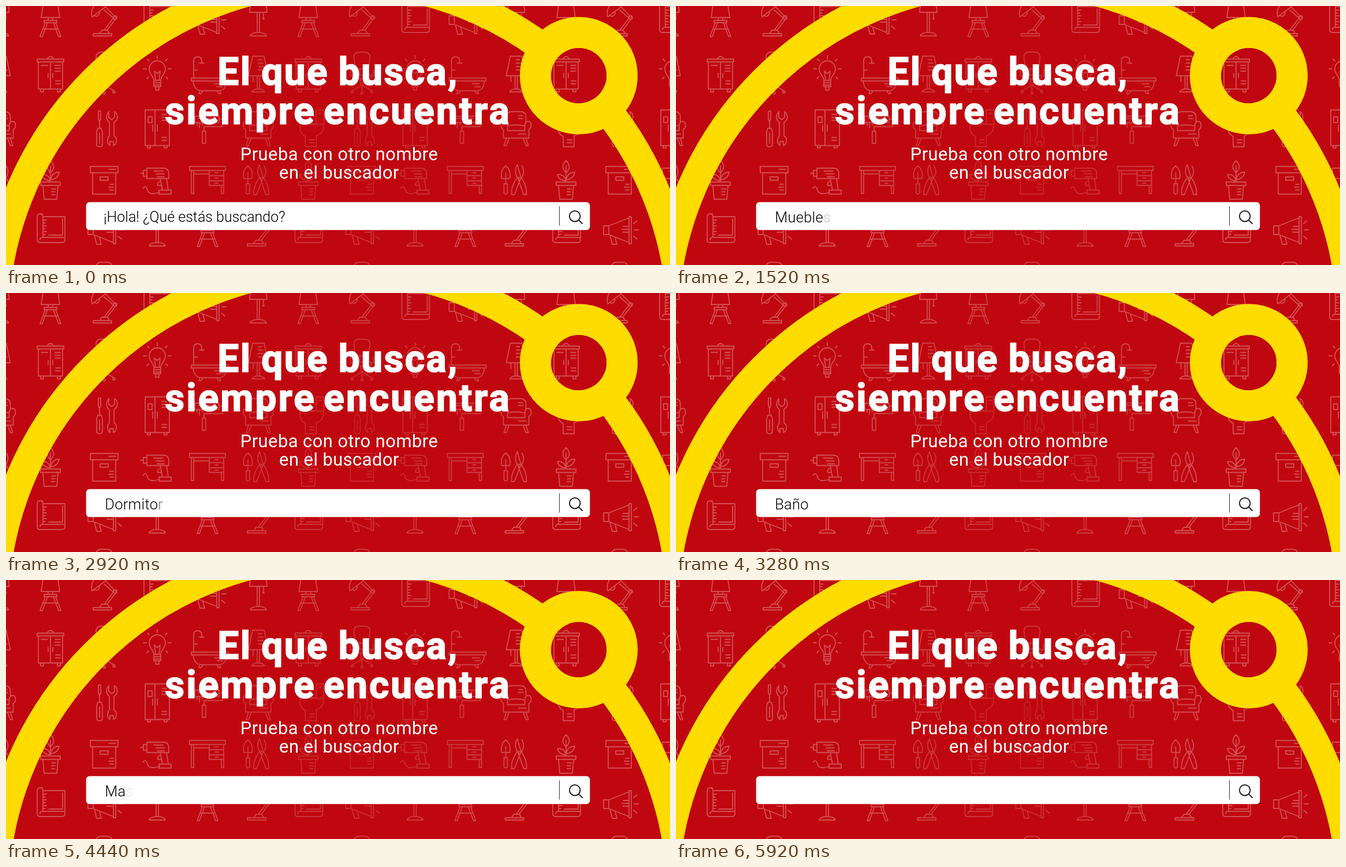
An HTML page for the animation above (6000 ms loop, 1150x450 px).

```html
<!DOCTYPE html>
<html lang="es">
<head>
<meta charset="utf-8">
<title>El que busca, siempre encuentra</title>
<style>
html, body { margin: 0; width: 100%; height: 100%; overflow: hidden; background: #c0070f; }
svg { display: block; width: 1150px; height: 450px; font-family: Roboto, "Open Sans", sans-serif; }
.icons { fill: none; stroke: #fff; stroke-width: 1.8; stroke-linejoin: round; stroke-linecap: round; }
.ring { fill: none; stroke: #ffdc00; }
.title { font-size: 66px; font-weight: 700; fill: #fff; stroke: #fff; stroke-width: 1.6; text-anchor: middle; }
.sub { font-size: 31px; letter-spacing: .4px; fill: #fff; text-anchor: middle; }
.query { font-size: 25.5px; font-weight: 300; letter-spacing: .25px; fill: #000; }
.query.hint { font-size: 25px; letter-spacing: 0; }
.lens { fill: none; stroke: #222; stroke-width: 2; stroke-linecap: round; }
</style>
</head>
<body>
<svg viewBox="0 0 1150 450">
  <defs>
    <radialGradient id="dim" gradientUnits="userSpaceOnUse" cx="600" cy="255" r="310">
      <stop offset="0" stop-color="#555"/>
      <stop offset=".4" stop-color="#888"/>
      <stop offset="1" stop-color="#fff"/>
    </radialGradient>
    <mask id="fade" maskUnits="userSpaceOnUse" x="0" y="0" width="1150" height="450">
      <rect width="1150" height="450" fill="url(#dim)"/>
    </mask>
    <mask id="hole" maskUnits="userSpaceOnUse" x="0" y="0" width="1150" height="450">
      <rect width="1150" height="450" fill="#fff"/>
      <circle cx="992" cy="121" r="48"/>
    </mask>
  </defs>
  <rect width="1150" height="450" fill="#c0070f"/>
  <g mask="url(#fade)"><g id="icons" class="icons" opacity=".29"></g></g>
  <g mask="url(#hole)">
    <circle class="ring" cx="574.5" cy="550" r="595.2" stroke-width="50.5"/>
    <circle class="ring" cx="992" cy="121" r="75" stroke-width="54"/>
  </g>
  <text class="title" x="575" y="137" letter-spacing="2.3" word-spacing="-2">El que busca,</text>
  <text class="title" x="575" y="205" letter-spacing="3" word-spacing="-6">siempre encuentra</text>
  <text class="sub" x="577" y="268">Prueba con otro nombre</text>
  <text class="sub" x="577" y="300">en el buscador</text>
  <rect x="138.700" y="340.700" width="872.600" height="48.600" rx="6" fill="#fff"/>
  <path d="M958.500 348V381.500" stroke="#333"/>
  <path class="lens" d="M992 372L998 378M994.500 365.200a9.300 9.300 0 1 0-18.600 0a9.300 9.300 0 1 0 18.600 0"/>
  <g id="queries"></g>
</svg>
<script>
const NS = "http://www.w3.org/2000/svg";
const add = (parent, tag, attrs) => {
  const el = document.createElementNS(NS, tag);
  for (const key in attrs) el.setAttribute(key, attrs[key]);
  return parent.appendChild(el);
};

// Line icons, each drawn around its own cell centre
const icons = {
  stool: "M-16-6L-12-34H12L16-6ZM-4-6V-1M4-6V-1M-11-1H11V3H-11ZM-9 3L-18 27H-14L-5 3M9 3L18 27H14L5 3M-12 14H12",
  deskLamp: "M-19 26V22H13V26ZM-8 22L-4 16H6L9 22M0 16L16-5L0-19M5 16L21-5L4-23M22-6a3 3 0 1 1-6 0a3 3 0 1 1 6 0M-21-7L3-25Q-4-36-15-29Q-24-21-21-7ZM-17-9Q-9-6-8-15",
  blueprint: "M-23 15V-24Q-23-30-18-30T-13-24V11M-18-30H-14M-13-25H25V11M-23 15Q-23 20-18 20H20Q25 20 25 15T20 11H-13Q-18 11-18 15M-13-19H-7M-13-14H-9M-13-9H-7M-13-4H-9M-13 1H-7M-13 6H-9M21-21V7H-3",
  megaphone: "M-28-9H-19V6H-28ZM-19-9L16-23V20L-19 6M16-25H20V22H16ZM-17 7L-13 23H-5L-8 11M6-8H16M4-3H16M5 2H16M24-13L30-18M25-2H32M24 9L30 14",
  floorLamp: "M-15-15Q-15-36 0-36T15-15ZM-2-15V20M2-15V20M-14 26Q-12 20 0 20T14 26ZM9-15V-5M9-5a1 1 0 1 0 .1 0",
  cabinet: "M-23-25H23V-20H-23ZM-21-20V27H21V-20M0-20V27M-17 27V32H-12V27M17 27V32H12V27M-4 0V7M4 0V7M-6-25Q0-34 6-25M-16-14H-5M8-14H17M8-9H17M8-4H17M9 13H17M9 18H17",
  chair: "M-11-8L-14-28Q-14-37-5-37H5Q14-37 14-28L11-8ZM-4-8V3M4-8V3M-16 3H16V9H-16ZM-20-6V4H-16M20-6V4H16M-2 9V20M2 9V20M0 20L-17 30M0 20L17 30M0 20V32M-15 32a2 2 0 1 1-4 0a2 2 0 1 1 4 0M2 34a2 2 0 1 1-4 0a2 2 0 1 1 4 0M19 32a2 2 0 1 1-4 0a2 2 0 1 1 4 0",
  bulb: "M-6 12C-6 4-14 2-14-8A14 14 0 0 1 14-8C14 2 6 4 6 12ZM-6 12V23H6V12M-6 16H6M-6 20H6M-3 23V29H3V23M-3 12L-5-4L0 0L5-4L3 12M0-31V-26M-17-25L-14-22M17-25L14-22M-24-8H-19M19-8H24M-18 9L-15 6M18 9L15 6",
  tub: "M-28 8H36V13H-28ZM-25 13Q-23 30-10 30H19Q32 30 33 13M-13 30L-15 35H-11L-8 30M21 30L23 35H19L16 30M-24 8V-22Q-24-29-17-29T-10-22V-18M-14-18H-6M-24-6H-18M12 18H24M16 23H26",
  lamp: "M-17 4L-10-30H10L17 4ZM-2 4V27M2 4V27M-11 32Q-9 27 0 27T11 32ZM-9 4V14M0-24H6M0-18H8M0-12H9M0-6H11",
  tools: "M-10-26H-6V-12L-8-8L-10-12ZM-8-8V4M-11 4H-5L-3 10V32Q-3 36-8 36T-13 32V10ZM-8 12V30M8-25V-15L13-11L18-15V-25Q25-20 22-11L17-6V17Q24 22 20 31L16 34V27H10V34Q2 27 9 17V-6Q0-14 8-25",
  fridge: "M-21-28H21V34H-21ZM-4-28V34M-17 34V38H-12V34M17 34V38H12V34M-8-2V9M0-2V9M-16-16H-9V-6H-16ZM8-20H16M8-15H16M8-10H16M8 20H16M8 25H16",
  roller: "M-22-17H20V-6H-22ZM20-12H26V1H-6V9M-9 9H-3V30H-9ZM-16-13H12M-18-6V-1M-14-6V3M-9-6V-2",
  armchair: "M-17-8V-15Q-17-25-7-25H7Q17-25 17-15V-8M-15 8V-1Q-15-8-21-8T-26-1Q-26 4-22 6V21H22V6Q26 4 26-1Q26-8 21-8T15-1V8ZM-15 0Q0-4 15 0M-17 21L-21 34H-17L-12 21M17 21L21 34H17L12 21M4-18H11M4-13H12M4 14H17",
  toilet: "M14-28H27V-3H14ZM-14-3H27Q27 13 14 17V36H-5V18Q-16 13-14-3ZM14-3L-8-8M18-22H23M2 24H10M2 29H10",
  plant: "M-17 6H17V12H-17ZM-13 12L-11 36H11L13 12M0 6V-22M0-10Q-11-20 0-31Q11-20 0-10M0 2Q13 1 15-11Q3-11 0 2M0 4Q-13 3-15-7Q-3-8 0 4M2 18H9M2 23H8M2 28H8",
  box: "M-24-21H24V-10H-24ZM-20-10V27H20V-10M-7-3H7V3H-7ZM8-16H20M10 10H16M8 15H16M10 20H16",
  drill: "M-18-18H10Q20-18 20-8V0H-18ZM-18-14H-24V-4H-18M-24-9H-29M5 0L9 20H19L16 0M3 20H24V27H3ZM4 5Q-1 8 1 12H7M4 24Q-14 30-17 20T-25 17M-6-13H10M-2-8H12M0-3H12",
  desk: "M-31-21H31V-14H-31ZM-28-14V26H-24V-14M3-14V12H28V-14M3-5H28M3 4H28M28 12V26H24V12M13-10H18M13-1H18M13 8H18M-24-8H3",
  garden: "M-18-22Q-8-14-11 0H-25Q-28-14-18-22ZM-18-10V9M-21 9H-15V25Q-18 29-21 25ZM2-24Q-5-12 4 2L13 28H18Q19 12 8-3ZM10-22Q17-10 7 2L-3 28H-8Q-9 12 3-3M8 0a2 2 0 1 1-4 0a2 2 0 1 1 4 0"
};
const rows = [
  "stool deskLamp blueprint megaphone floorLamp",
  "cabinet chair bulb tub lamp",
  "toilet tools fridge roller armchair",
  "plant box drill desk garden",
  "blueprint megaphone floorLamp stool deskLamp",
  "tub chair lamp cabinet bulb"
];
const columns = [77, 170, 262, 349, 437];
const iconLayer = document.getElementById("icons");
rows.forEach((row, r) => row.split(" ").forEach((name, c) => {
  for (let tile = -1; tile < 3; tile++) {
    const x = columns[c] + tile * 446.5, y = 26 + r * 91.25;
    add(iconLayer, "path", { d: icons[name], transform: `translate(${x} ${y})` });
  }
}));

// Typing and erasing spans in ms; letters fade one after another
const queries = [
  { text: "¡Hola! ¿Qué estás buscando?", type: [-2, -1], erase: [385, 630], hint: true },
  { text: "Muebles", type: [630, 835], erase: [1490, 1760] },
  { text: "Dormitorio", type: [1760, 2035], erase: [2860, 3100] },
  { text: "Baño", type: [3100, 3275], erase: [4020, 4300] },
  { text: "Mascotas", type: [4300, 4835], erase: [5500, 5915] }
];
const queryLayer = document.getElementById("queries");
for (const q of queries) {
  const line = add(queryLayer, "text", {
    class: q.hint ? "query hint" : "query", x: q.hint ? 169 : 171.2, y: q.hint ? 375 : 376
  });
  q.letters = [...q.text].map(ch => {
    const letter = add(line, "tspan", {});
    letter.textContent = ch;
    return letter;
  });
}

const LOOP = 6000, STEP = 40;
const clamp = v => Math.min(1, Math.max(0, v));
const progress = (t, [from, to]) => clamp((t - from) / (to - from));

function draw(time) {
  const t = Math.floor((time % LOOP) / STEP) * STEP;
  for (const q of queries) {
    const shown = q.letters.length * (progress(t, q.type) - progress(t, q.erase));
    q.letters.forEach((letter, i) => letter.setAttribute("fill-opacity", clamp(shown - i)));
  }
}

const start = performance.now();
function tick() {
  draw(performance.now() - start);
  requestAnimationFrame(tick);
}
tick();
</script>
</body>
</html>
```
